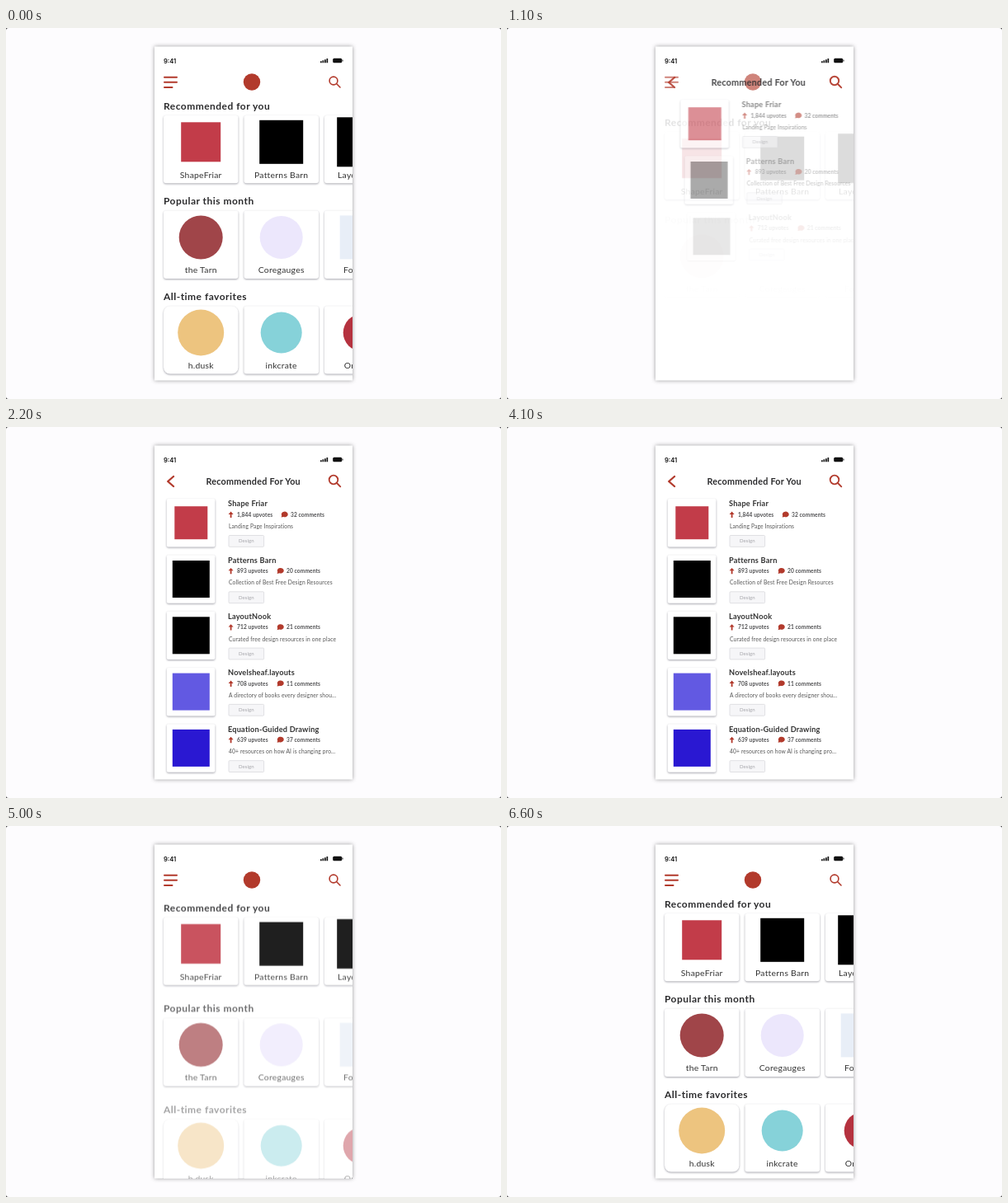
Recreate the animation shown at these times as an HTML page. Size 600 by 450 pixels, loop 6.7 s.

```html
<!DOCTYPE html>
<html lang="en">
<head>
<meta charset="utf-8">
<title>App list transition</title>
<style>
  html, body { margin: 0; width: 100%; height: 100%; overflow: hidden; background: #3a3a3c; }
  svg { display: block; width: 600px; height: 450px; }
  text { font-family: Lato, "Open Sans", sans-serif; fill: #333; }
  .clock { font: 600 7.6px Inter, sans-serif; fill: #111; }
  .section { font-size: 12px; font-weight: 700; letter-spacing: .47px; fill: #2b2b2d; }
  .heading { font-size: 10.8px; font-weight: 700; letter-spacing: .23px; fill: #2b2b2d; }
  .label { font-size: 10.4px; letter-spacing: .25px; }
  .name { font-size: 9.2px; font-weight: 700; letter-spacing: .2px; }
  .stat { font-size: 6.6px; font-weight: 700; letter-spacing: .12px; fill: #505052; }
  .note { font-size: 6.7px; letter-spacing: .14px; fill: #555; }
  .tag { font-size: 6px; letter-spacing: .1px; fill: #a5a5aa; }
  .mid { text-anchor: middle; }
  .line { fill: none; stroke: #b23a2c; stroke-width: 2; stroke-linecap: round; stroke-linejoin: round; }
  .red { fill: #b23a2c; }
  .card { fill: #fff; filter: drop-shadow(0 1.2px 1.2px rgba(40, 40, 60, .42)); }
  .phone { fill: #fff; filter: drop-shadow(0 0 2.5px rgba(0, 0, 0, .4)); }
</style>
</head>
<body>
<svg viewBox="0 0 600 450">
  <defs>
    <clipPath id="screen"><rect x="180" y="22.5" width="240" height="405"/></clipPath>
  </defs>
  <rect width="600" height="450" rx="3" fill="#fdfcfe"/>
  <rect class="phone" x="180" y="22.5" width="240" height="405"/>
  <g clip-path="url(#screen)">
    <text class="clock" x="191" y="42.5">9:41</text>
    <path d="M381 40.3h1.7v1.9h-1.7zM383.5 39.3h1.7v2.9h-1.7zM386 38.2h1.7v4h-1.7zM388.5 37h1.7v5.2h-1.7z" fill="#111"/>
    <rect x="396.2" y="36.8" width="11" height="5.5" rx="1.5" fill="#111"/>
    <rect x="407.5" y="38.6" width="1" height="1.9" rx=".5" fill="#111"/>

    <g id="home"></g>
    <g id="list"></g>

    <g id="homeBar">
      <path class="line" d="M192 59.7h15M192 65.8h15M192 71.9h9.5"/>
      <circle class="red" cx="298" cy="65.5" r="10.2"/>
      <g class="line" style="stroke-width:1.6">
        <circle cx="397" cy="64" r="4.9"/><path d="M400.8 67.8l4.2 4.2"/>
      </g>
    </g>
    <g id="listBar">
      <path class="line" style="stroke-width:2.3" d="M203 60l-6.8 6 6.8 6"/>
      <g class="line" style="stroke-width:1.8">
        <circle cx="397" cy="64" r="5.3"/><path d="M401 68l4.3 4.3"/>
      </g>
      <text id="heading" class="heading mid" x="299.7" y="70">Recommended For You</text>
    </g>
  </g>
</svg>
<script>
const LOOP = 6700;
const SMOOTH = 'cubic-bezier(.333,0,.667,1)';
const $ = id => document.getElementById(id);

const square = (x, y, size, fill) =>
  `<rect x="${x - size / 2}" y="${y - size / 2}" width="${size}" height="${size}" fill="${fill}"/>`;
const circle = (x, y, size, fill) =>
  `<circle cx="${x}" cy="${y}" r="${size / 2}" fill="${fill}"/>`;

// Each card: label, mark shape, mark size, colour
const sections = [
  ['Recommended for you', [
    ['ShapeFriar', square, 48, '#c23c49'],
    ['Patterns Barn', square, 53, '#000'],
    ['LayoutNook', square, 60, '#000']]],
  ['Popular this month', [
    ['the Tarn', circle, 53, '#a04549'],
    ['Coregauges', circle, 52, '#ece7fc'],
    ['Foldmark', square, 53, '#e8eef7']]],
  ['All-time favorites', [
    ['h.dusk', circle, 56, '#edc47f'],
    ['inkcrate', circle, 50, '#86d2d9'],
    ['Orbwells', circle, 45, '#b5323f']]]
];

// Each row: name, upvotes, comments, comment x, note, mark size, colour
const rows = [
  ['Shape Friar', '1,844', 32, 337, 'Landing Page Inspirations', 40, '#c23c49'],
  ['Patterns Barn', '893', 20, 332, 'Collection of Best Free Design Resources', 45, '#000'],
  ['LayoutNook', '712', 21, 332, 'Curated free design resources in one place', 45, '#000'],
  ['Novelsheaf.layouts', '708', 11, 332, 'A directory of books every designer shou...', 45, '#6259e2'],
  ['Equation-Guided Drawing', '639', 37, 332, '40+ resources on how AI is changing pro...', 45, '#2a18d2']
];

function sectionMarkup([title, cards], i) {
  const top = i * 115.6;
  const body = cards.map(([label, mark, size, fill], k) => {
    const x = 191 + k * 97.5;
    const round = i === 2 && k === 0 ? 8 : 3;
    return `<rect class="card" x="${x}" y="${top + 106}" width="90.5" height="82.3" rx="${round}"/>` +
      mark(x + 45.2, top + 138.3, size, fill) +
      `<text class="label mid" x="${x + 45.2}" y="${top + 181.7}">${label}</text>`;
  }).join('');
  return `<g><text class="section" x="191" y="${top + 98.6}">${title}</text>${body}</g>`;
}

function rowMarkup([name, votes, comments, cx, note, size, fill], i) {
  return `<g><g transform="translate(0 ${i * 68.3})">
    <rect class="card" x="194.8" y="87" width="58.6" height="58.5" rx="2"/>
    ${square(224.3, 116.2, size, fill)}
    <text class="name" x="269" y="96.4">${name}</text>
    <path class="red" d="M272.6 102.6l3 3.4h-2.1v4h-1.8v-4h-2.1z"/>
    <text class="stat" x="280" y="108.9">${votes} upvotes</text>
    <path class="red" d="M${cx - 3.4} 109.6l.6-2.2a4 3.3 0 1 1 2.2 1.6z"/>
    <text class="stat" x="${cx + 8}" y="108.9">${comments} comments</text>
    <text class="note" x="270" y="123.2">${note}</text>
    <rect x="270" y="131.5" width="42.6" height="13.8" rx="1" fill="#f6f6f8" stroke="#dadade" stroke-width=".8"/>
    <text class="tag mid" x="291.3" y="140.4">Design</text>
  </g></g>`;
}

// Keys are [ms, value, easing to the next key]
function track(el, prop, keys) {
  const all = [[0, keys[0][1]], ...keys, [LOOP, keys[keys.length - 1][1]]];
  el.animate(
    all.map(([ms, value, easing = SMOOTH]) => ({ offset: ms / LOOP, [prop]: value, easing })),
    { duration: LOOP, iterations: Infinity });
}
const move = (x, y) => `translate(${x}px, ${y}px)`;

$('home').innerHTML = sections.map(sectionMarkup).join('');
$('list').innerHTML = rows.map(rowMarkup).join('');

[...$('home').children].forEach((el, i) => {
  const out = 795 - i * 65, back = 4645 + i * 105;
  track(el, 'opacity', [[out, 1], [out + 400, 0], [back, 0, 'ease-out'], [back + 500, 1]]);
  track(el, 'transform', [[out, move(0, 0)], [out + 400, move(0, 23)],
    [back, move(0, 23)], [back + 500, move(0, 0)]]);
});

[...$('list').children].forEach((el, i) => {
  const enter = 860 + i * 100, leave = 4465 - i * 85;
  track(el, 'opacity', [[enter, 0, 'linear'], [enter + 420, 1], [leave, 1], [leave + 350, 0]]);
  track(el, 'transform', [[enter, move(24, 0)], [enter + 600, move(0, 0)],
    [leave, move(0, 0)], [leave + 350, move(0, 23)]]);
});

track($('homeBar'), 'opacity', [[850, 1], [1450, 0], [4600, 0], [4950, 1]]);
track($('listBar'), 'opacity', [[680, 0, 'ease-out'], [1280, 1], [4520, 1], [4870, 0]]);
track($('heading'), 'transform', [[680, move(24, 0)], [1280, move(0, 0)]]);
</script>
</body>
</html>
```
